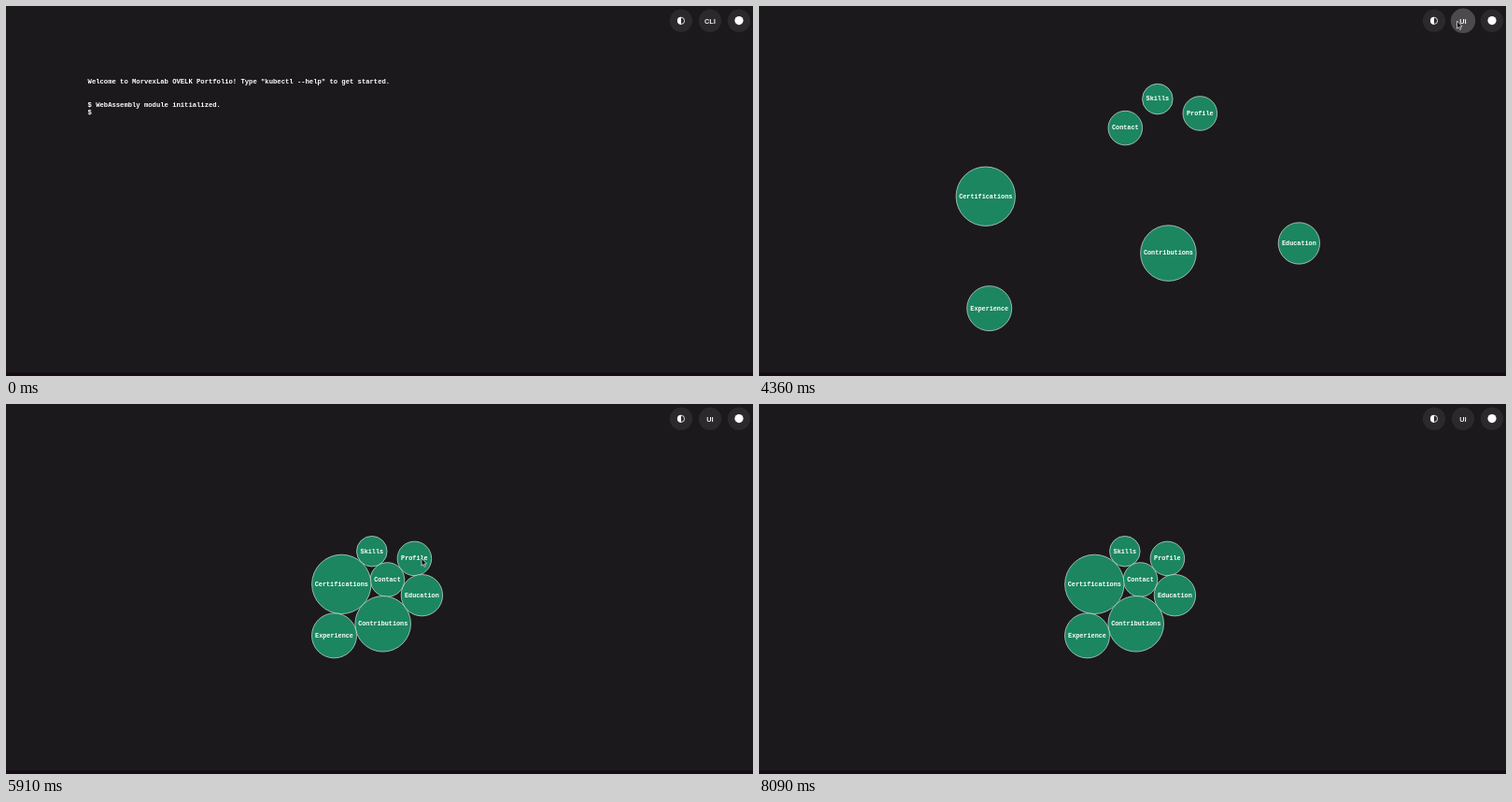
Recreate the animation shown at these times as an HTML page. Size 800 by 396 pixels, loop 8.45 s.

```html
<!DOCTYPE html>
<html lang="en">
<head>
<meta charset="utf-8">
<title>Terminal portfolio</title>
<style>
  html, body { margin: 0; width: 100%; height: 100%; overflow: hidden; background: #1b191c; }
  svg { display: block; width: 100vw; height: 100vh; }
  text { fill: #fff; font: bold 7.19px "Liberation Mono", "Courier New", monospace; white-space: pre; }
  #details text { font-size: 7.67px; }
  #details .title { font-size: 11.45px; }
  #bubbles text { font-size: 6.8px; text-anchor: middle; }
  #bubbles circle { fill: #1c8661; stroke: #d5e6df; stroke-width: .7; }
  #toolbar .button { fill: #2b292c; }
  #toolbar text { font: 500 8px Roboto, sans-serif; text-anchor: middle; }
</style>
</head>
<body>
<svg viewBox="0 0 800 396" preserveAspectRatio="none">
  <defs><clipPath id="pane"><rect x="90" y="48" width="610" height="308.6"/></clipPath></defs>
  <rect width="800" height="396" fill="#1b191c"/>
  <rect y="392.3" width="800" height="3.7" fill="#190a18"/>

  <g id="terminal">
    <g id="lines"></g>
    <rect id="caret" width="4.3" height="8.1" fill="#fff"/>
  </g>

  <g id="bubbles"></g>

  <g id="toolbar">
    <circle class="button" cx="723" cy="15.8" r="12.2"/>
    <circle class="button" id="modeButton" cx="754" cy="15.8" r="12.2"/>
    <circle class="button" cx="785" cy="15.8" r="12.2"/>
    <circle cx="723" cy="15.8" r="3.6" fill="none" stroke="#fff" stroke-width=".8"/>
    <path d="M723 11.8a4 4 0 0 0 0 8z" fill="#fff"/>
    <text id="modeLabel" x="754" y="18.7"></text>
    <circle cx="785" cy="15.6" r="4.6" fill="#fff"/>
  </g>

  <g id="details">
    <path d="M22 18H12.4M16.9 13.2 12.1 18l4.8 4.8" fill="none" stroke="#fff" stroke-width="1.5"/>
    <text class="title" x="36" y="21.7">Profile</text>
    <g id="yaml" clip-path="url(#pane)"></g>
    <rect x="700.6" y="48.5" width="4" height="43.5" rx="1.5" fill="#4b494c"/>
  </g>

  <path id="pointer" d="M0 0V8.2L1.9 6.5 3.1 9.3 4.4 8.7 3.2 6H5.6Z" fill="#111" stroke="#eee" stroke-width=".7"/>
</svg>

<script>
const LOOP = 8450, OPEN_GRAPH = 4270, OPEN_DETAILS = 6200, CLOSE_DETAILS = 7520;
const $ = id => document.getElementById(id);

function add(parent, tag, attrs, content = '') {
  const node = document.createElementNS('http://www.w3.org/2000/svg', tag);
  for (const key in attrs) node.setAttribute(key, attrs[key]);
  node.textContent = content;
  return parent.appendChild(node);
}
const show = (id, visible) => $(id).setAttribute('visibility', visible ? 'visible' : 'hidden');

// Terminal
const CELL = 4.314, ROW = 8.13, LEFT = 87.6, BASE = 83.3;
const command = 'kubectl get profile';
const keyTimes = [30, 120, 210, 300, 450, 700, 730, 880, 1030, 1090, 1150, 1210,
  1270, 1330, 1520, 1610, 1700, 1790, 1880];
const RESULT = 2270;
const columns = ['NAME', 'NAMESPACE', 'CONTRIBUTIONS', 'EXPERIENCE', 'CERTIFICATIONS',
  'EDUCATION', 'SKILLS', 'CONTACT', 'AGE'];
const values = ['Profile', 'default', 'Contributions', 'Experience', 'Certifications',
  'Education', 'Skills', 'Contact', '27s'];
const tableRow = cells => cells.map((cell, i) =>
  cell.padEnd(Math.max(columns[i].length, values[i].length) + 2)).join('').trimEnd();
const addLine = (row, content) =>
  add($('lines'), 'text', { x: LEFT, y: BASE + row * ROW }, content);

addLine(0, 'Welcome to MorvexLab OVELK Portfolio! Type "kubectl --help" to get started.');
addLine(3, '$ WebAssembly module initialized.');
const prompt = addLine(4, '$');
const output = [tableRow(columns), tableRow(values), '$'].map((s, i) => addLine(5 + i, s));

function drawTerminal(t) {
  const typed = keyTimes.filter(k => k <= t);
  const done = t >= RESULT;
  prompt.textContent = '$ ' + command.slice(0, typed.length);
  output.forEach(line => line.setAttribute('visibility', done ? 'inherit' : 'hidden'));
  const lastInput = done ? RESULT : typed.at(-1) ?? -600;
  const column = 2 + (done ? 0 : typed.length);
  $('caret').setAttribute('x', LEFT + column * CELL);
  $('caret').setAttribute('y', BASE - 6.2 + (done ? 7 : 4) * ROW);
  $('caret').setAttribute('opacity', (t - lastInput) % 1200 < 600 ? 1 : 0);
}

// Bubbles: name, radius, then scattered, gathered and settled positions
const bubbles = [
  ['Skills', 16.3, [427, 99.3], [392.8, 157.7], [391.8, 157.7]],
  ['Profile', 18.3, [472.5, 114.7], [435.6, 165.5], [437.4, 165.4]],
  ['Contact', 18.3, [392.2, 130.3], [408.7, 187.5], [408.5, 188]],
  ['Certifications', 31.7, [242.2, 203.8], [360, 192.6], [359.3, 192.9]],
  ['Contributions', 29.8, [438.6, 264.7], [404, 235], [403.7, 235.3]],
  ['Education', 22.2, [579, 254.2], [445.2, 204.7], [445.4, 204.7]],
  ['Experience', 24, [246.2, 324], [352.5, 247], [351.5, 247.9]],
].map(([name, radius, ...stops]) => {
  const node = add($('bubbles'), 'g', {});
  add(node, 'circle', { r: radius });
  add(node, 'text', { y: 1.9 }, name);
  return { node, stops };
});

const progress = (t, from, to) => Math.min(1, Math.max(0, (t - from) / (to - from)));
const mix = (a, b, p) => a + (b - a) * p;
const easeOut = p => 1 - (1 - p) ** 3;
const easeInOut = p => p * p * (3 - 2 * p);
const linear = p => p;

function drawBubbles(t) {
  const gather = easeOut(progress(t, 4360, 4990));
  const settle = progress(t, 5000, 5900);
  for (const { node, stops: [far, near, rest] } of bubbles) {
    const [x, y] = [0, 1].map(i => mix(mix(far[i], near[i], gather), rest[i], settle));
    node.setAttribute('transform', `translate(${x} ${y})`);
  }
}

// Profile page
const yaml = `Kind: odofdinf
Name: Profile
Namespace: default
Owner: {}
CreationTimestamp: '2025-01-19T13:58:41.318+01:00'
Contributions:
  Kind: contributions
  Name: Contributions
  Namespace: default
  Owner:
    Kind: profile
    Name: Profile
    Namespace: default
  CreationTimestamp: '0001-01-01T00:00:00Z'
  Contributions:
    - Project: Spin
      Description: >-
        Developer tool for building WebAssembly microservices and web
        applications from Dorvell
      Link: https://github.com/fermyon/developer/graphs/contributors
    - Project: CloudTTY
      Description: >-
        A Kubernetes cloudshell operator in the Civic Lattice Networks
        Foundation
      Link: https://cloudtty.github.io/cloudtty/#contributors
    - Project: Jesse
      Description: A Kubernetes helm chart for the Jesse AI trading bot
      Link: https://github.com/MorvexLab/jesse-chart
    - Project: ovelk-portfolio
      Description: This portfolio, isn't it awesome?
      Link: https://github.com/MorvexLab/ovelk-portfolio
Experience:
  Kind: experience
  Name: Experience
  Namespace: default`;
yaml.split('\n').forEach((line, i) => {
  const indent = line.search(/\S/);
  add($('yaml'), 'text', { x: 98 + indent * 4.602, y: 66.2 + i * 8.63 }, line.trim());
});

// Pointer: time, x, y, easing of the way there
const pointerPath = [
  [2790, 400, 270, linear],
  [3090, 472.3, 143.5, linear],
  [3610, 724, 26, easeOut],
  [4000, 747.5, 16, easeInOut],
  [4430, 747.5, 16, linear],
  [5000, 450, 169.5, easeInOut],
  [5700, 445, 165, easeInOut],
  [6300, 445, 165, linear],
  [7250, 20.5, 16.5, easeInOut],
  [7640, 20.5, 16.5, linear],
  [8080, 22, 5, easeInOut],
];

function drawPointer(t) {
  const next = pointerPath.findIndex(stop => stop[0] > t);
  show('pointer', next > 0);
  if (next < 1) return;
  const [t0, x0, y0] = pointerPath[next - 1], [t1, x1, y1, ease] = pointerPath[next];
  const p = ease(progress(t, t0, t1));
  $('pointer').setAttribute('transform', `translate(${mix(x0, x1, p)} ${mix(y0, y1, p)})`);
}

function drawToolbar(t) {
  const hover = progress(t, 3720, 3900) * (1 - progress(t, 4520, 4700));
  const shade = [43, 41, 44].map(c => Math.round(c + 33 * hover));
  $('modeButton').style.fill = `rgb(${shade})`;
  $('modeButton').setAttribute('r', 12.2 + hover);
  $('modeLabel').textContent = t < OPEN_GRAPH ? 'CLI' : 'UI';
}

function render(t) {
  const inDetails = t >= OPEN_DETAILS && t < CLOSE_DETAILS;
  show('terminal', t < OPEN_GRAPH);
  show('bubbles', t >= OPEN_GRAPH && !inDetails);
  show('toolbar', !inDetails);
  show('details', inDetails);
  if (t < OPEN_GRAPH) drawTerminal(t);
  else output.forEach(line => line.setAttribute('visibility', 'inherit'));
  drawBubbles(t);
  drawToolbar(t);
  drawPointer(t);
}

const start = performance.now();
function tick() {
  render((performance.now() - start) % LOOP);
  requestAnimationFrame(tick);
}
tick();
</script>
</body>
</html>
```
